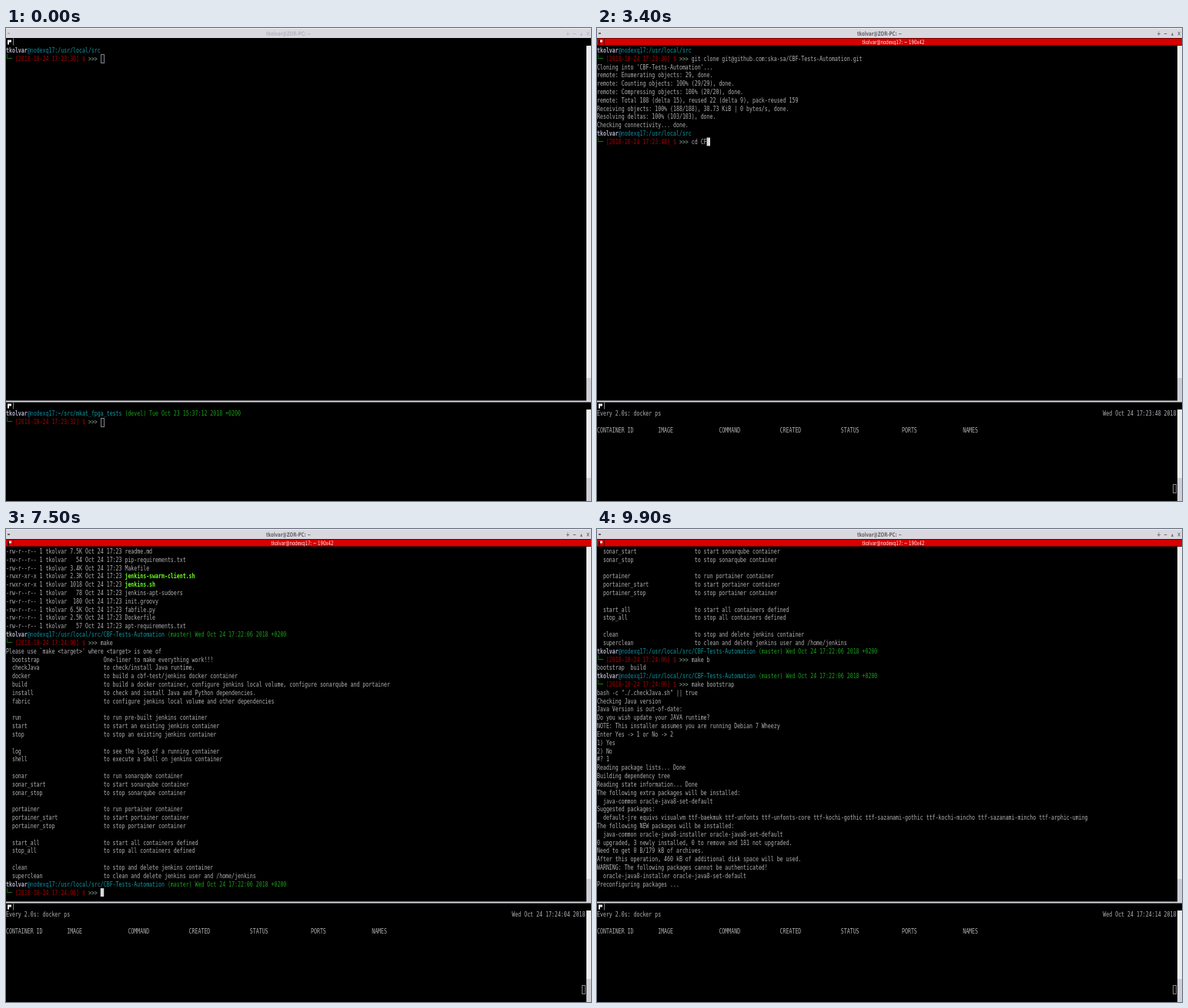
These frames come from a looping animation (760 by 615 pixels, 10000 ms). An HTML page with a canvas:

```html
<!DOCTYPE html>
<html lang="en">
<head>
<meta charset="utf-8">
<title>Terminal session</title>
<style>
html, body { margin: 0; width: 100%; height: 100%; overflow: hidden; background: #000; }
canvas { display: block; }
</style>
</head>
<body>
<canvas id="stage" width="760" height="615"></canvas>
<script>
const ctx = document.getElementById('stage').getContext('2d');
const LOOP = 10000, STEP = 100;
const CELL = 3.96, ROW = 10.82, SQUASH = 0.709; // the screen is narrowed as a whole
const MONO = '9.3px "DejaVu Sans Mono", monospace';
const SANS = '"DejaVu Sans", sans-serif';
const FG = '#b2b0b4', USER = '#b4b2c6', HOST = '#128ca4', PATH = '#129a9e', GIT = '#18a418',
      STAMP = '#a80000', ARROW = '#8aa890', EXEC = '#6cff20',
      BAR = '#d9d8df', PALE = '#ecebee', RED = '#d80000', HOLLOW = '#84828a';
const NAME = 'tkolvar', BOX = 'nodexq17';

// ---- lines: functions of time giving { segs: [text, colour, bold], cur: column }
const plain = s => () => ({ segs: [[s, FG]] });
const prompt = (dir, git = '') => () => ({
  segs: [[NAME, USER, true], ['@' + BOX, HOST], [':' + dir, PATH], [git && ' ' + git, GIT]]
});
const cmd = (clock, typed, column) => t => {
  const s = typed(t);
  return {
    segs: [['└─ ', GIT], [`[2018-10-24 ${clock}] $ `, STAMP], ['>>> ', ARROW], [s, FG]],
    cur: 31 + (column ? column(t, s) : s.length)
  };
};
const typing = (s, from, to) => t =>
  s.slice(0, Math.max(0, Math.ceil(s.length * (t - from) / (to - from))));
const states = list => t => list.reduce((s, [at, v]) => t >= at ? v : s, '');

const counting = t => {
  const n = Math.max(1, Math.min(29, Math.round((t - 2400) * 0.27)));
  const pct = String(Math.floor(n / 29 * 100)).padStart(3);
  const s = `remote: Counting objects: ${pct}% (${n}/29)`;
  return n < 29 ? { segs: [[s, FG]], cur: 29 } : { segs: [[s + ', done.', FG]] };
};

const file = (size, name, exec) => () => ({
  segs: [[`${exec ? '-rwxr-xr-x' : '-rw-r--r--'} 1 ${NAME} ${size.padStart(4)} Oct 24 17:23 `, FG],
         [name, exec ? EXEC : FG, exec]]
});

const target = s => {
  const [name, info] = s.split('|');
  const text = info ? '  ' + name.padEnd(30) + info : '';
  return t => ({ segs: [[text, FG]], mark: name === 'bootstrap' && t >= 8100 });
};

const SRC = prompt('/usr/local/src');
const REPO = prompt('/usr/local/src/CBF-Tests-Automation', '(master) Wed Oct 24 17:22:06 2018 +0200');
const DEVEL = prompt('~/src/mkat_fpga_tests', '(devel) Tue Oct 23 15:37:12 2018 +0200');
const TABLE = plain(['CONTAINER ID', 'IMAGE', 'COMMAND', 'CREATED', 'STATUS', 'PORTS', 'NAMES']
  .map(s => s.padEnd(20)).join(''));

const HELP = `bootstrap|One-liner to make everything work!!!
checkJava|to check/install Java runtime.
docker|to build a cbf-test/jenkins docker container
build|to build a docker container, configure jenkins local volume, configure sonarqube and portainer
install|to check and install Java and Python dependencies.
fabric|to configure jenkins local volume and other dependencies

run|to run pre-built jenkins container
start|to start an existing jenkins container
stop|to stop an existing jenkins container

log|to see the logs of a running container
shell|to execute a shell on jenkins container

sonar|to run sonarqube container
sonar_start|to start sonarqube container
sonar_stop|to stop sonarqube container

portainer|to run portainer container
portainer_start|to start portainer container
portainer_stop|to stop portainer container

start_all|to start all containers defined
stop_all|to stop all containers defined

clean|to stop and delete jenkins container
superclean|to clean and delete jenkins user and /home/jenkins`.split('\n').map(target);

const log = [], shell = [];
const put = (list, at, ...lines) =>
  lines.forEach(l => list.push({ at, line: typeof l === 'string' ? plain(l) : l }));

put(log, 0, SRC, cmd('17:23:30', typing('git clone git@github.com:ska-sa/CBF-Tests-Automation.git', 400, 1300)));
put(log, 1500, "Cloning into 'CBF-Tests-Automation'...");
put(log, 2200, 'remote: Enumerating objects: 29, done.');
put(log, 2400, counting);
put(log, 2700, 'remote: Compressing objects: 100% (20/20), done.');
put(log, 2800, 'remote: Total 188 (delta 15), reused 22 (delta 9), pack-reused 159');
put(log, 2900, 'Receiving objects: 100% (188/188), 38.73 KiB | 0 bytes/s, done.');
put(log, 3000, 'Resolving deltas: 100% (103/103), done.');
put(log, 3100, 'Checking connectivity... done.');
put(log, 3200, SRC, cmd('17:23:48', states([[3300, 'cd '], [3400, 'cd CF'], [3600, 'cd C'],
  [3800, 'cd Cb'], [3900, 'cd Cbf']])));
put(log, 4300, 'cbf-scripts/          CBF-Tests-Automation/', SRC,
  cmd('17:23:48', states([[4300, 'cd Cbf'], [4800, 'cd C'], [5100, 'cd CB'], [5300, 'cd CBF-Tests-Automation/']])));
put(log, 5800, REPO, cmd('17:23:57', typing('ls -lrh', 5900, 6200)));
put(log, 6300, 'total 52K', file('7.5K', 'readme.md'), file('54', 'pip-requirements.txt'),
  file('3.4K', 'Makefile'), file('2.3K', 'jenkins-swarm-client.sh', true), file('1018', 'jenkins.sh', true),
  file('78', 'jenkins-apt-sudoers'), file('180', 'init.groovy'), file('6.5K', 'fabfile.py'),
  file('2.5K', 'Dockerfile'), file('57', 'apt-requirements.txt'));
put(log, 6400, REPO, cmd('17:24:00', typing('make', 6700, 7100)));
put(log, 7200, 'Please use `make <target>\' where <target> is one of', ...HELP,
  REPO, cmd('17:24:06', typing('make b', 7700, 8300)));
put(log, 8400, 'bootstrap  build', REPO,
  cmd('17:24:06', states([[8400, 'make b'], [8600, 'make bo'], [8800, 'make bootstrap ']])));
put(log, 9000, 'bash -c "./.checkJava.sh" || true', 'Checking Java version');
put(log, 9100, 'Java Version is out-of-date:', 'Do you wish update your JAVA runtime?',
  'NOTE: This installer assumes you are running Debian 7 Wheezy', 'Enter Yes -> 1 or No -> 2',
  '1) Yes', '2) No', t => ({ segs: [[t < 9400 ? '#? ' : '#? 1', FG]], cur: t < 9400 ? 3 : 4 }));
put(log, 9500, 'Reading package lists... Done');
put(log, 9600, 'Building dependency tree', 'Reading state information... Done');
put(log, 9700, 'The following extra packages will be installed:', '  java-common oracle-java8-set-default',
  'Suggested packages:',
  '  default-jre equivs visualvm ttf-baekmuk ttf-unfonts ttf-unfonts-core ttf-kochi-gothic ' +
  'ttf-sazanami-gothic ttf-kochi-mincho ttf-sazanami-mincho ttf-arphic-uming',
  'The following NEW packages will be installed:',
  '  java-common oracle-java8-installer oracle-java8-set-default',
  '0 upgraded, 3 newly installed, 0 to remove and 181 not upgraded.',
  'Need to get 0 B/179 kB of archives.',
  'After this operation, 460 kB of additional disk space will be used.');
put(log, 9800, 'WARNING: The following packages cannot be authenticated!',
  '  oracle-java8-installer oracle-java8-set-default');
put(log, 9900, 'Preconfiguring packages ...');

put(shell, 0, DEVEL, cmd('17:23:32', typing('docker ps', 1600, 1900)));
put(shell, 2000, TABLE);
put(shell, 2100, DEVEL, cmd('17:23:44',
  states([[2300, 'docker ps'], [2400, "docker ps'"], [2500, "watch 'docker ps'"]]),
  (t, s) => t === 2500 ? 2 : s.length));

// ---- drawing
function rect(x, y, w, h, colour) {
  ctx.fillStyle = colour;
  ctx.fillRect(x, y, w, h);
}

function text(s, x, y, colour, font) {
  ctx.font = font;
  ctx.fillStyle = colour;
  ctx.setTransform(SQUASH, 0, 0, 1, x, y);
  ctx.fillText(s, 0, 0);
  ctx.resetTransform();
}

function label(s, x, y, colour, font) {
  ctx.textAlign = 'center';
  text(s, x, y, colour, font);
  ctx.textAlign = 'left';
}

function drawPane(lines, t, top, rows, focused) {
  let view = lines.filter(l => l.at <= t).map(l => l.line(t));
  if (view[view.length - 1].cur === undefined) view.push({ segs: [] });
  view = view.slice(-rows);
  view.forEach(({ segs, cur, mark }, i) => {
    const y = top + i * ROW, hasCursor = cur !== undefined && i === view.length - 1;
    if (mark) rect(2 * CELL, y, 9 * CELL, ROW, BAR);
    if (hasCursor && focused) rect(cur * CELL, y, CELL + 0.5, ROW, BAR);
    let col = 0;
    for (const [s, colour, bold] of segs)
      for (const ch of s) {
        const inverse = mark && col >= 2 && col < 11 || hasCursor && focused && col === cur;
        if (ch !== ' ') text(ch, col * CELL, y + 8.4, inverse ? '#000' : colour, (bold ? 'bold ' : '') + MONO);
        col++;
      }
    if (hasCursor && !focused) hollow(cur, y);
  });
}

function hollow(col, y) {
  ctx.strokeStyle = HOLLOW;
  ctx.strokeRect(Math.round(col * CELL) + 0.5, Math.round(y) + 0.5, 4, 11);
}

function header(y, title, focused) {
  const ink = focused ? '#400000' : PALE;
  if (focused) rect(0, y, 760, 9, RED);
  rect(2, y + 2, 2, 6, ink);
  rect(4, y + 2, 3, 3, focused ? PALE : ink);
  rect(9, y, 1, 9, focused ? '#700000' : HOLLOW);
  if (focused) label(title, 385, y + 7, '#fff0f0', '7.6px ' + SANS);
}

function scrollbar(y, bottom, thumb) {
  rect(754, y, 6, bottom - y, PALE);
  rect(754, thumb, 6, bottom - thumb, '#cfced4');
}

function titleBar(active) {
  const ink = active ? '#66656c' : '#b6b5bc';
  rect(0, 0, 760, 13, BAR);
  rect(0, 0, 760, 1, PALE);
  label(NAME + '@ZOR-PC: ~', 367, 10, ink, 'bold 7.6px ' + SANS);
  rect(2, 6, 3, 2, ink);
  ['+', '−', '▴', '×'].forEach((s, i) => label(s, 730 + i * 8.7, 10, ink, 'bold 8px ' + SANS));
}

function watch(t) {
  const sec = 48 + 2 * Math.floor((t - 3200) / 500);
  const clock = `17:${23 + Math.floor(sec / 60)}:${String(sec % 60).padStart(2, '0')}`;
  const first = 'Every 2.0s: docker ps'.padEnd(166) + `Wed Oct 24 ${clock} 2018`;
  return [plain(first), plain(''), TABLE].map(line => ({ at: 0, line }));
}

function draw(t) {
  const focus = t < 200 ? '' : t >= 1500 && t < 3100 ? 'bottom' : 'top';
  const upper = focus === 'top', lower = focus === 'bottom';
  rect(0, 0, 760, 615, '#000');
  titleBar(t >= 200);
  header(13.5, `${NAME}@${BOX}: ~ 190x42`, upper);
  drawPane(log, t, 23.5, 42, upper);
  scrollbar(23, 485, 455);
  rect(0, 484.5, 760, 2, BAR);
  header(486.5, '/bin/bash 190x10', lower);
  const watching = t >= 2700;
  drawPane(watching ? watch(t) : shell, t, 496, 10, lower);
  if (watching) hollow(189, 496 + 9 * ROW - 0.5);
  scrollbar(496, 615, 585);
}

let shown = -1;
function tick() {
  const t = Math.floor(performance.now() % LOOP / STEP) * STEP;
  if (t !== shown) draw(shown = t);
  requestAnimationFrame(tick);
}
tick();
</script>
</body>
</html>
```
